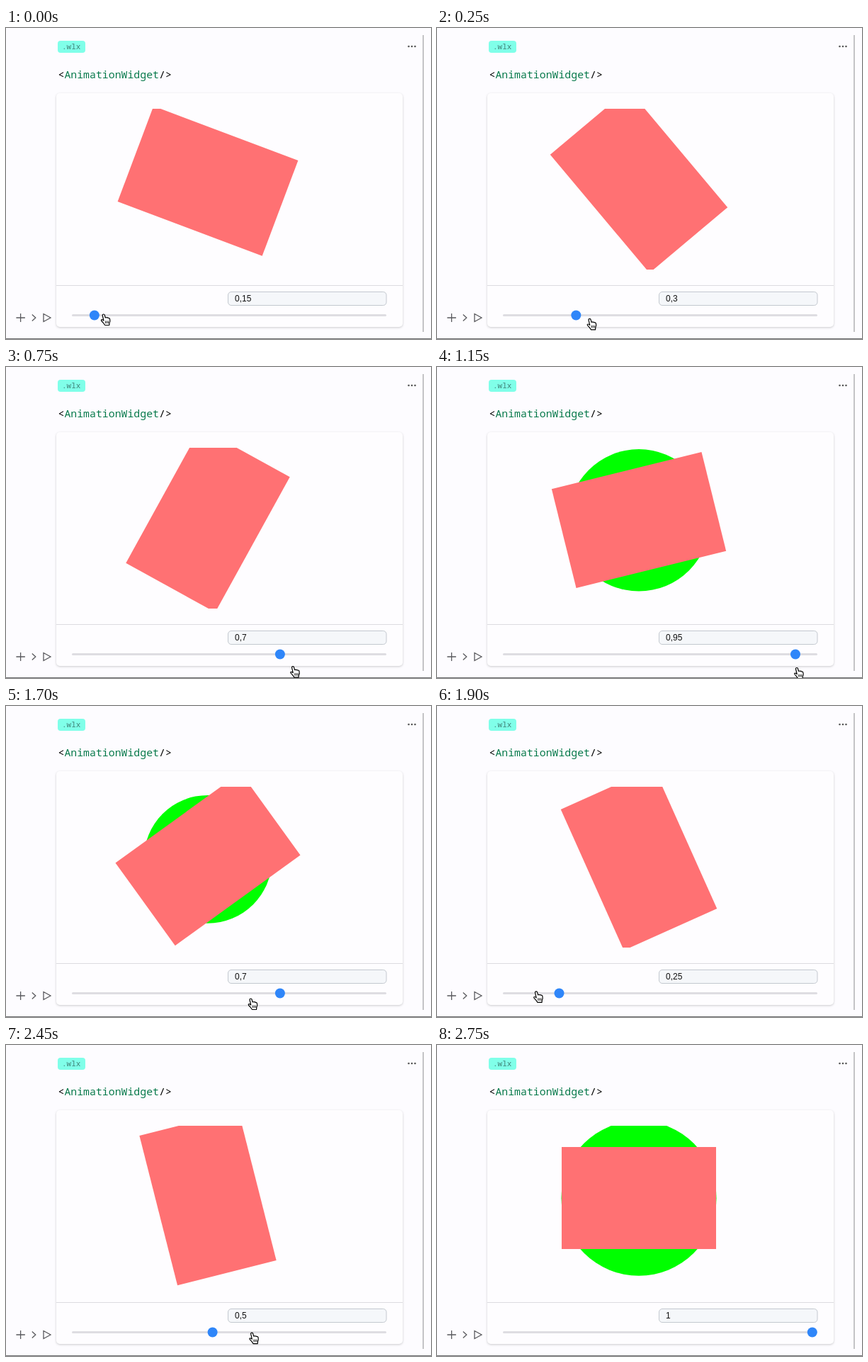
An HTML page that plays this animation: 600 by 439 pixels, repeating every 2800 ms.

```html
<!DOCTYPE html>
<html lang="en">
<head>
<meta charset="utf-8">
<title>Animation widget</title>
<style>
  html, body { margin: 0; width: 100%; height: 100%; overflow: hidden; background: #fdfcff; }
  svg { display: block; width: 600px; height: 439px; }
  .mono { font-family: "Noto Sans Mono", "DejaVu Sans Mono", monospace; }
  .icon { fill: none; stroke: #5a5a5e; stroke-width: 1.3; }
  #card { fill: #fefdff; filter: drop-shadow(0 1px 1.5px rgba(0, 0, 0, .2)); }
  #value { font: 12px "Liberation Sans", Arial, sans-serif; fill: #111; }
</style>
</head>
<body>
<svg viewBox="0 0 600 439">
  <clipPath id="plot"><rect x="94" y="114" width="444" height="227"/></clipPath>

  <rect x="73" y="18" width="39" height="17" rx="4" fill="#80ffe9"/>
  <text class="mono" x="79" y="29.5" font-size="11" fill="#42857b">.wlx</text>
  <text class="mono" x="73.5" y="71" font-size="14.85" font-weight="500">&lt;<tspan fill="#087a4b">AnimationWidget</tspan>/&gt;</text>
  <path d="M568.5 26h9.1" stroke="#555" stroke-width="2.6" stroke-linecap="round" stroke-dasharray="0 4.5"/>
  <path d="M589 10V429" stroke="#8b8b8e"/>
  <path d="M0 438.5H600" stroke="#707073"/>

  <rect id="card" x="71" y="92" width="489" height="330" rx="5"/>
  <path d="M71 363.5H560" stroke="#dcdbe0"/>

  <g clip-path="url(#plot)">
    <circle id="disk" cx="285" cy="216.3" fill="#0f0"/>
    <rect id="box" x="176" y="144" width="218" height="144" fill="#ff7173"/>
  </g>

  <rect x="313.5" y="372.5" width="223.5" height="19" rx="4.5" fill="#f5f7fa" stroke="#c3c8cf"/>
  <text id="value" x="323" y="386"></text>
  <rect x="93" y="404" width="444" height="3" rx="1.5" fill="#dedde2"/>
  <circle id="knob" cy="405.5" r="7" fill="#2f86f9"/>

  <path class="icon" d="M14.4 409H26.9M20.6 403V415M36.8 404.5L41.8 409L36.8 413.5M53 403.5L63 409L53 414.5Z"/>

  <g id="hand" stroke="#000" stroke-width="1.2" stroke-linejoin="round">
    <path fill="#fff" d="M-1.5 1.5Q-1.5 0 0 0T1.6 1.5L2.6 5Q3.4 4 4.6 5Q5.6 4.2 6.6 5.4Q8.6 5 9 7.2Q9.6 10 8.4 12L8 15.5H2L-.5 12Q-3.8 9 -3.2 8Q-2 7 .2 9Z"/>
    <path fill="none" stroke-width=".9" d="M2.8 9.5V13M4.8 9.5V13M6.8 9.5V13"/>
  </g>
</svg>
<script>
const LOOP = 2800, STEP = 50;
const TRACK_START = 53.4, TRACK_LENGTH = 476.4, MAX_RADIUS = 109.5;
const KNOB_LAG = 45, ANGLE_LAG = 95, RADIUS_LAG = 112;

// Turning points of the pointer as [time, position]: right, back left, right again
const pointerX = track([
  [-120, 100], [450, 282], [750, 405], [1100, 501], [1400, 508],
  [1605, 435], [1900, 140], [2080, 98], [2200, 115], [2750, 650]
]);
const pointerY = track([[0, 404], [950, 425], [1700, 413], [2200, 392], [2750, 432]]);

const $ = id => document.getElementById(id);

// Smooth curve through the points (cubic Hermite)
function track(points) {
  const last = points.length - 1;
  const slope = i => {
    const [t0, p0] = points[Math.max(i - 1, 0)], [t1, p1] = points[Math.min(i + 1, last)];
    return (p1 - p0) / (t1 - t0);
  };
  return t => {
    let i = 0;
    while (i < last - 1 && points[i + 1][0] <= t) i++;
    const [t0, p0] = points[i], [t1, p1] = points[i + 1];
    const span = t1 - t0, u = (t - t0) / span, w = 1 - u;
    return p0 * w * w * (1 + 2 * u) + p1 * u * u * (3 - 2 * u)
      + span * u * w * (slope(i) * w - slope(i + 1) * u);
  };
}

// Slider value under the pointer
function level(t) {
  return Math.min(1, Math.max(.1, (pointerX(t) - TRACK_START) / TRACK_LENGTH));
}

function draw(now) {
  const t = Math.floor(now % LOOP / STEP) * STEP;
  const value = Math.round(level(t - KNOB_LAG) * 20) / 20;
  $('knob').setAttribute('cx', TRACK_START + TRACK_LENGTH * value);
  $('value').textContent = String(value).replace('.', ',');
  $('box').setAttribute('transform', `rotate(${180 * level(t - ANGLE_LAG)} 285 216)`);
  $('disk').setAttribute('r', MAX_RADIUS * level(t - RADIUS_LAG));
  $('hand').setAttribute('transform', `translate(${pointerX(t)} ${pointerY(t)})`);
}

const start = performance.now();
function tick() {
  draw(performance.now() - start);
  requestAnimationFrame(tick);
}
tick();
</script>
</body>
</html>
```
